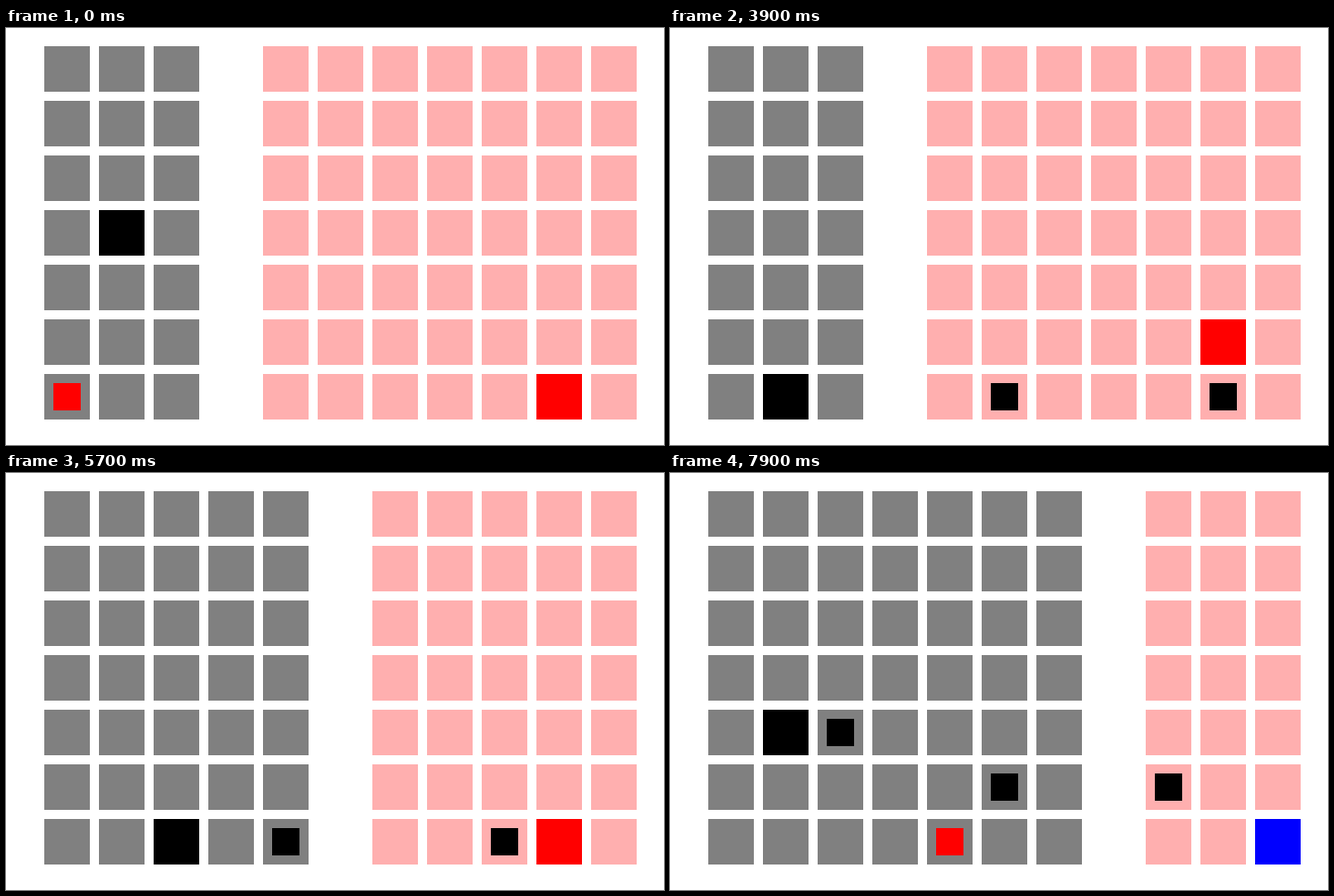
Recreate the animation shown at these times as an HTML page with a canvas. Size 722 px wide and 458 px high, loop 8000 ms.

```html
<!DOCTYPE html>
<html lang="en">
<head>
<meta charset="utf-8">
<title>Grid duel</title>
<style>
html, body { margin: 0; width: 100%; height: 100%; overflow: hidden; background: #fff; }
canvas { display: block; }
</style>
</head>
<body>
<canvas id="stage" width="722" height="458"></canvas>
<script>
const ctx = document.getElementById('stage').getContext('2d');
const LOOP = 8000, FRAME = 100, TICK = 50, START = -400, FLASH = 300;
const COLS = 11, ROWS = 7;

// The game clock skips ahead once
const gameTime = t => t < 2600 ? t : t + 250;

// Black's steering: time, row to head for, column if not 1
const legs = [
  [START, 3], [3600, 6], [4400, 4], [4900, 3], [5050, 5], [5550, 6, 2],
  [6550, 5], [6750, 6], [7300, 5], [7400, 6], [7650, 5], [8100, 4]
];

// Black's bursts of fire: first shot, interval, count
const bursts = [[3400, 200, 11], [5700, 200, 2], [6050, 150, 15]];
const blackFires = g => bursts.some(([from, gap, count]) =>
  g >= from && (g - from) % gap === 0 && (g - from) / gap < count);

// Red moves and fires at a steady beat
const redTurn = k => Math.round((919 * k - 381) / TICK) * TICK;

// Red circles near the back and keeps its distance from the border
function placeRed(red, k, border) {
  const sway = k % 2 ? (k < 2 ? -1 : 1) : 0;
  red.col = Math.min(COLS - 1, Math.max(9 + sway, border + 4));
  red.row = k > 2 && (k + 1) % 4 < 2 ? 5 : 6;
}

function play() {
  const states = [], black = { col: 1, row: 3 }, red = {};
  let bullets = [], border = 3, hitAt = -Infinity, turn = 0;
  const meets = (a, b) => a.col === b.col && a.row === b.row;

  for (let g = START; g <= gameTime(LOOP); g += TICK) {
    for (const b of bullets) b.col += b.dir;

    const [since, row, col = 1] = legs.filter(leg => leg[0] <= g).pop();
    if ((g - since) % 100 === 0) {
      black.col += Math.sign(col - black.col);
      black.row += Math.sign(row - black.row);
    }

    bullets = bullets.filter(b => {
      if (meets(b, b.dir > 0 ? red : black)) {
        border += b.dir;
        if (b.dir > 0) hitAt = g;
        return false;
      }
      return b.col >= 0 && b.col < COLS;
    });

    if (g === redTurn(turn)) {
      placeRed(red, turn++, border);
      bullets.push({ col: red.col - 1, row: red.row, dir: -1 });
    }
    if (blackFires(g)) bullets.push({ col: black.col + 1, row: black.row, dir: 1 });

    states.push({
      border, black: { ...black }, red: { ...red },
      bullets: bullets.map(b => ({ ...b })),
      struck: g - hitAt < FLASH
    });
  }
  return states;
}

function square({ col, row }, color, inset = 0, size = 50) {
  ctx.fillStyle = color;
  ctx.fillRect(42 + col * 60 + inset, 20 + row * 60 + inset, size, size);
}

function draw({ border, black, red, bullets, struck }) {
  ctx.fillStyle = '#fff';
  ctx.fillRect(0, 0, 722, 458);
  for (let col = 0; col < COLS; col++) {
    if (col === border) continue;
    for (let row = 0; row < ROWS; row++) {
      square({ col, row }, col < border ? '#808080' : '#ffafaf');
    }
  }
  for (const b of bullets) square(b, b.dir > 0 ? '#000' : '#f00', 10, 30);
  square(black, '#000');
  square(red, struck ? '#00f' : '#f00');
}

const states = play();
const begin = performance.now();
function loop() {
  const t = (performance.now() - begin) % LOOP;
  const g = gameTime(Math.floor(t / FRAME) * FRAME);
  draw(states[(g - START) / TICK]);
  requestAnimationFrame(loop);
}
loop();
</script>
</body>
</html>
```
